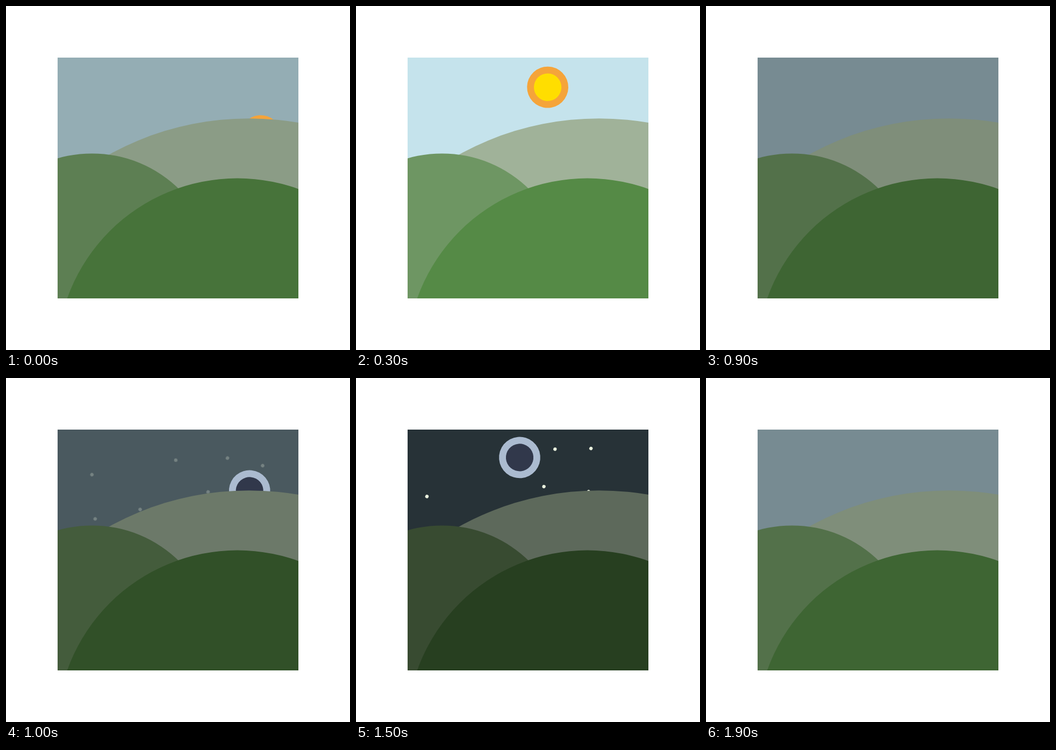
An HTML page for the animation above (2 s loop, 640x640 px).

```html
<!DOCTYPE html>
<html lang="en">
<head>
<meta charset="utf-8">
<title>Day and night</title>
<style>
  html, body { margin: 0; width: 100%; height: 100%; overflow: hidden; background: #fff; }
  svg { display: block; width: 100%; height: 100%; }
</style>
</head>
<body>
<svg viewBox="0 0 640 640">
  <defs>
    <clipPath id="window"><rect x="96" y="96" width="448" height="448"/></clipPath>
  </defs>
  <g clip-path="url(#window)">
    <rect id="sky" x="96" y="96" width="448" height="448"/>
    <g id="stars" fill="#e9f0de"></g>
    <g id="orbit">
      <circle cx="320" cy="147.2" r="38.4" fill="#f5a43a"/>
      <circle cx="320" cy="147.2" r="25.6" fill="#ffde00"/>
      <circle cx="320" cy="492.8" r="38.4" fill="#abbbd0"/>
      <circle cx="320" cy="492.8" r="25.6" fill="#31384b"/>
    </g>
    <circle id="back" cx="452" cy="747.2" r="538"/>
    <circle id="left" cx="160" cy="505.9" r="231.5"/>
    <circle id="front" cx="430.4" cy="656.6" r="336"/>
  </g>
</svg>
<script>
  const STEP = 100, STEPS = 20, SUNSET = 9, MIDNIGHT = 14;

  // Night and day colours per layer.
  const layers = {
    sky: ["#273237", "#c6e4ed"],
    back: ["#5d695b", "#a0b399"],
    left: ["#384b31", "#6e9763"],
    front: ["#273f20", "#558b46"]
  };

  // Distance from the pole and angle at midnight.
  const starSpots = [
    [212.8, -59.8], [164.6, -80.4], [103.3, -54], [167.2, -12.4], [121.6, 16.4],
    [194.2, 17.3], [222.3, 34.1], [156.5, 48.4], [268.7, 61.2]
  ];

  const byId = id => document.getElementById(id);
  const stars = byId("stars");
  const orbit = byId("orbit");
  const spin = (node, angle) => node.setAttribute("transform", `rotate(${angle} 320 320)`);

  for (const [radius, angle] of starSpots) {
    const star = document.createElementNS(stars.namespaceURI, "circle");
    star.setAttribute("cx", 320);
    star.setAttribute("cy", 320 - radius);
    star.setAttribute("r", 3.2);
    spin(star, angle);
    stars.append(star);
  }

  // Sun angle from the zenith: slow overhead, fast near the horizon.
  const dayAngle = t => 63 - 33.5 * t + 7.37 * t ** 2 - 0.615 * t ** 3;
  const nightAngle = k => -180 - 4.72 * k - 0.424 * k ** 3 - 0.0043 * k ** 5;

  function draw(time) {
    const step = Math.floor(time / STEP) % STEPS;
    const k = step - MIDNIGHT;
    const angle = step < SUNSET ? dayAngle(step) : nightAngle(k);
    const height = Math.cos(angle * Math.PI / 180);
    const light = 0.5 + 0.39 * height + 0.12 * height ** 3;

    spin(orbit, angle);
    spin(stars, -2.27 * k - 0.03 * k ** 3);
    stars.setAttribute("opacity", Math.min(1, Math.max(0, 1 - 3.3 * light)));
    for (const [id, [night, day]] of Object.entries(layers)) {
      byId(id).style.fill = `color-mix(in srgb, ${day} ${Math.max(0, light * 100)}%, ${night})`;
    }
  }

  function loop() {
    draw(performance.now());
    requestAnimationFrame(loop);
  }
  loop();
</script>
</body>
</html>
```
